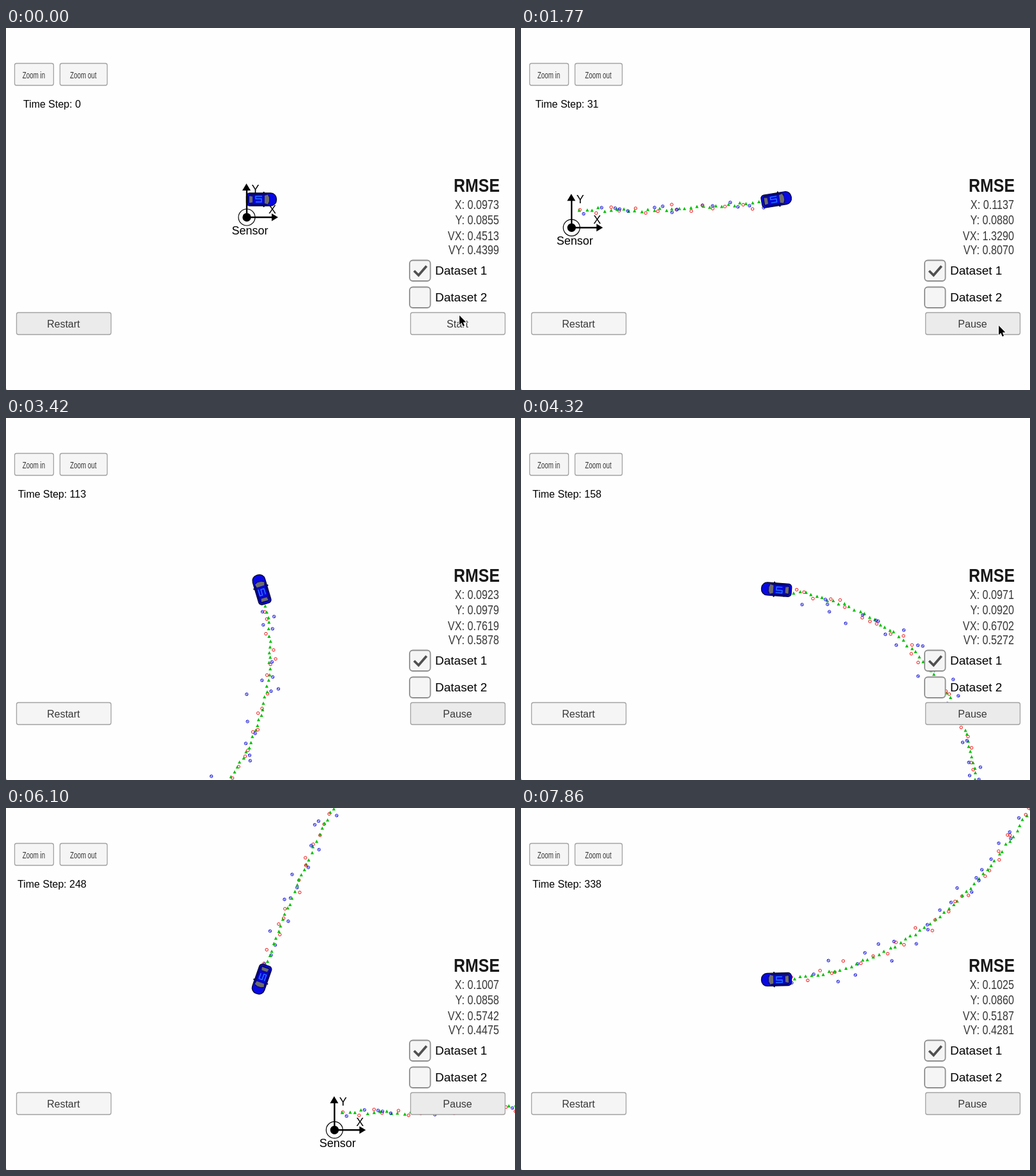
An HTML page with a canvas that plays this animation: 797x568 px, repeating every 8 s.

```html
<!DOCTYPE html>
<html lang="en">
<head>
<meta charset="utf-8">
<title>Sensor tracking simulator</title>
<style>
  html, body { margin: 0; width: 100%; height: 100%; overflow: hidden; background: #fefefe; }
  canvas { display: block; }
</style>
</head>
<body>
<canvas id="stage" width="797" height="568"></canvas>
<script>
const ctx = document.getElementById('stage').getContext('2d');
const SANS = '"Liberation Sans", Arial, sans-serif';
const TAU = Math.PI * 2;
const LOOP = 8000, TICK = 148.7;
const CAR = [400, 269];
const SENSOR = [-23, 28];            // sensor relative to the car's start
const LAST = 338;

// [tick, time step]
const STEPS = [[8, 1], [12, 31], [23, 113], [34, 195], [41, 248], [45, 279], [53, LAST]];
// [time step, X, Y, VX, VY]
const ERRORS = [
  [1, .15, .06, 5.2, .25],
  [31, .1137, .0880, 1.3290, .8070],
  [113, .0923, .0979, .7619, .5878],
  [195, .0997, .0887, .6200, .4940],
  [248, .1007, .0858, .5742, .4475],
  [279, .0981, .0837, .5452, .4257],
  [LAST, .1025, .0860, .5187, .4281]
];
// [ms, x, y]
const POINTER = [[0, 710, 451], [890, 747, 467], [1770, 747, 467], [2220, 781, 470]];

// Linear interpolation through rows whose first entry is the key
function sample(rows, key, warp = v => v) {
  let i = 1;
  while (i < rows.length - 1 && rows[i][0] < key) i++;
  const a = rows[i - 1], b = rows[i];
  const raw = (warp(key) - warp(a[0])) / (warp(b[0]) - warp(a[0]));
  const f = Math.min(1, Math.max(0, raw));
  return a.slice(1).map((v, j) => v + (b[j + 1] - v) * f);
}

// The car weaves: its yaw rate is a sine over 500 steps
const phase = s => s * TAU / 500;
const heading = s => 2.188 * (1 - Math.cos(phase(s)));
const speed = s => 9.72 * (1 - .075 * Math.sin(phase(s)) ** 2 - .0055 * Math.cos(phase(s)));

const path = [[0, 0]];
for (let s = 0; s < LAST; s++) {
  const [x, y] = path[s], a = heading(s + .5), v = speed(s + .5);
  path.push([x + v * Math.cos(a), y - v * Math.sin(a)]);
}

let seed = 20417;
function random() {
  seed = (Math.imul(seed, 1664525) + 1013904223) >>> 0;
  return seed / 4294967296;
}
const gauss = sigma => (random() + random() + random() - 1.5) * 2 * sigma;

// Odd steps are laser readings, even steps radar readings
const marks = [];
for (let i = 1; i <= LAST; i++) {
  const [x, y] = i < 2 ? [-10, 0] : path[i - 2];
  const laser = i % 2 === 1;
  const estimate = [x + gauss(.8), y + gauss(i < 12 ? 2 : 1.3)];
  let reading;
  if (i === 1) reading = [x, y];
  else if (laser) reading = [x + gauss(5), y + gauss(5)];
  else {
    const dx = x - SENSOR[0], dy = y - SENSOR[1], r = Math.hypot(dx, dy);
    const along = gauss(9) / r, across = gauss(.018);
    reading = [x + dx * along - dy * across, y + dy * along + dx * across];
  }
  marks.push({ laser, estimate, reading });
}

function text(str, x, y, size, { color = '#000', align = 'center', weight = '', narrow = 1 } = {}) {
  ctx.save();
  ctx.translate(x, y);
  ctx.scale(narrow, 1);
  ctx.font = `${weight} ${size}px ${SANS}`;
  ctx.textAlign = align;
  ctx.fillStyle = color;
  ctx.fillText(str, 0, 0);
  ctx.restore();
}

function shape(points, fill) {
  ctx.beginPath();
  points.forEach(([x, y]) => ctx.lineTo(x, y));
  ctx.closePath();
  ctx.fillStyle = fill;
  ctx.fill();
}

function line(points, color, width) {
  ctx.beginPath();
  points.forEach(([x, y]) => ctx.lineTo(x, y));
  ctx.strokeStyle = color;
  ctx.lineWidth = width;
  ctx.stroke();
}

function disc(x, y, r, fill, stroke, width = 1) {
  ctx.beginPath();
  ctx.arc(x, y, r, 0, TAU);
  if (fill) { ctx.fillStyle = fill; ctx.fill(); }
  if (stroke) { ctx.strokeStyle = stroke; ctx.lineWidth = width; ctx.stroke(); }
}

function box(x, y, w, h, r, fill, stroke, width = 1.3) {
  ctx.beginPath();
  ctx.roundRect(x, y, w, h, r);
  ctx.fillStyle = fill;
  ctx.fill();
  if (stroke) { ctx.strokeStyle = stroke; ctx.lineWidth = width; ctx.stroke(); }
}

function drawMark({ laser, estimate, reading }) {
  const [x, y] = reading, [ex, ey] = estimate;
  disc(x, y, 2.2, null, laser ? '#f01010' : '#1010d8');
  if (!laser) line([[x - 1.3, y - 1], [x + 1.3, y + 1]], '#1010d8', 1);
  shape([[ex - 2.6, ey + 2.3], [ex, ey - 2.7], [ex + 2.6, ey + 2.3]], '#00c000');
}

function drawCar(angle) {
  ctx.save();
  ctx.translate(...CAR);
  ctx.rotate(-angle);
  for (const side of [-1, 1]) line([[3, side * 9], [4, side * 12]], '#000030', 2);
  ctx.beginPath();
  ctx.roundRect(-23.5, -10, 47, 20, [5, 9, 9, 5]);
  ctx.fillStyle = '#0808e4';
  ctx.fill();
  ctx.strokeStyle = '#06062c';
  ctx.lineWidth = 1.3;
  ctx.stroke();
  box(-20, -8, 32, 16, 4, '#0a0aa8', '#04042a', 1);
  shape([[5, -6], [10, -7.5], [12, -3], [12, 3], [10, 7.5], [5, 6]], '#6c6c6c');
  shape([[-19, -5.5], [-14, -4.5], [-14, 4.5], [-19, 5.5]], '#6c6c6c');
  box(-12, -7, 16, 14, 3, '#0606d8');
  line([[1, -5], [-9, -5], [-9, -1], [0, -1], [0, 4], [-9, 4]], '#2878ff', 1.4);
  ctx.restore();
}

function drawSensor(x, y) {
  ctx.save();
  ctx.translate(x, y);
  disc(0, 0, 13, null, '#000', 1.2);
  disc(0, 0, 6.7, '#000');
  line([[0, 0], [0, -44]], '#000', 2.4);
  line([[0, 0], [40, 0]], '#000', 2.4);
  shape([[-7, -42], [-.5, -53], [6, -42]], '#000');
  shape([[39, -6], [49, 0], [39, 6]], '#000');
  text('Y', 13.5, -38, 18);
  text('X', 40, -6, 18);
  text('Sensor', 5, 27, 18);
  ctx.restore();
}

function button(x, y, w, label, style = {}, dark = false) {
  box(x + .5, y + .5, w, 34.5, 3, dark ? '#ebebeb' : '#f5f5f5', '#a2a2a2');
  const { size = 16, narrow = 1 } = style;
  text(label, x + w / 2, y + (size < 16 ? 24 : 24), size, { color: '#383838', narrow });
}

function checkbox(y, label, checked) {
  box(632, y, 32.5, 32.5, 5, '#f5f5f5', '#8f8f8f', 1.8);
  if (checked) line([[639, y + 16.5], [646, y + 23.5], [658.5, y + 9]], '#505050', 3.8);
  text(label, 672, y + 22.5, 19, { align: 'left' });
}

function drawPanel(step, errors) {
  const running = step > 0, small = { size: 14, narrow: .7 };
  button(13, 55, 61, 'Zoom in', small);
  button(84, 55, 74, 'Zoom out', small);
  text('Time Step: ' + step, 72, 125, 16);
  text('RMSE', 773, 257, 30, { color: '#181818', align: 'right', weight: 'bold', narrow: .83 });
  ['X', 'Y', 'VX', 'VY'].forEach((name, i) =>
    text(`${name}: ${errors[i].toFixed(4)}`, 772, [284, 308, 333, 355][i], 20,
      { color: '#383838', align: 'right', narrow: .81 }));
  checkbox(364.5, 'Dataset 1', true);
  checkbox(406.5, 'Dataset 2', false);
  button(16, 446, 148, 'Restart', {}, !running);
  button(633, 446, 148, running ? 'Pause' : 'Start', {}, running);
  disc(-1, 568, 2.5, '#b8b8b8');
}

function drawPointer(x, y) {
  ctx.save();
  ctx.translate(x, y);
  const arrow = [[0, 0], [0, 14.5], [3.3, 11.5], [5.6, 17], [8, 16], [5.8, 10.7], [10.3, 10.5]];
  line([...arrow, arrow[0]], '#fff', 2);
  shape(arrow, '#000');
  ctx.restore();
}

function draw(ms) {
  const tick = Math.min(53, Math.floor((ms + 25) / TICK));
  const time = tick * TICK;
  const step = tick < 8 ? 0 : Math.round(sample(STEPS, tick)[0]);
  const errors = step ? sample(ERRORS, step, s => 1 / Math.sqrt(s)) : [.0973, .0855, .4513, .4399];
  const [x, y] = path[step];

  ctx.fillStyle = '#fefefe';
  ctx.fillRect(0, 0, 797, 568);
  ctx.save();
  ctx.translate(CAR[0] - x, CAR[1] - y);
  marks.slice(0, step).forEach(drawMark);
  ctx.restore();
  drawCar(heading(step));
  drawSensor(CAR[0] - x + SENSOR[0], CAR[1] - y + SENSOR[1]);
  drawPanel(step, errors);
  if (tick < 16) drawPointer(...sample(POINTER, time));
}

function loop() {
  draw(performance.now() % LOOP);
  requestAnimationFrame(loop);
}
loop();
</script>
</body>
</html>
```
